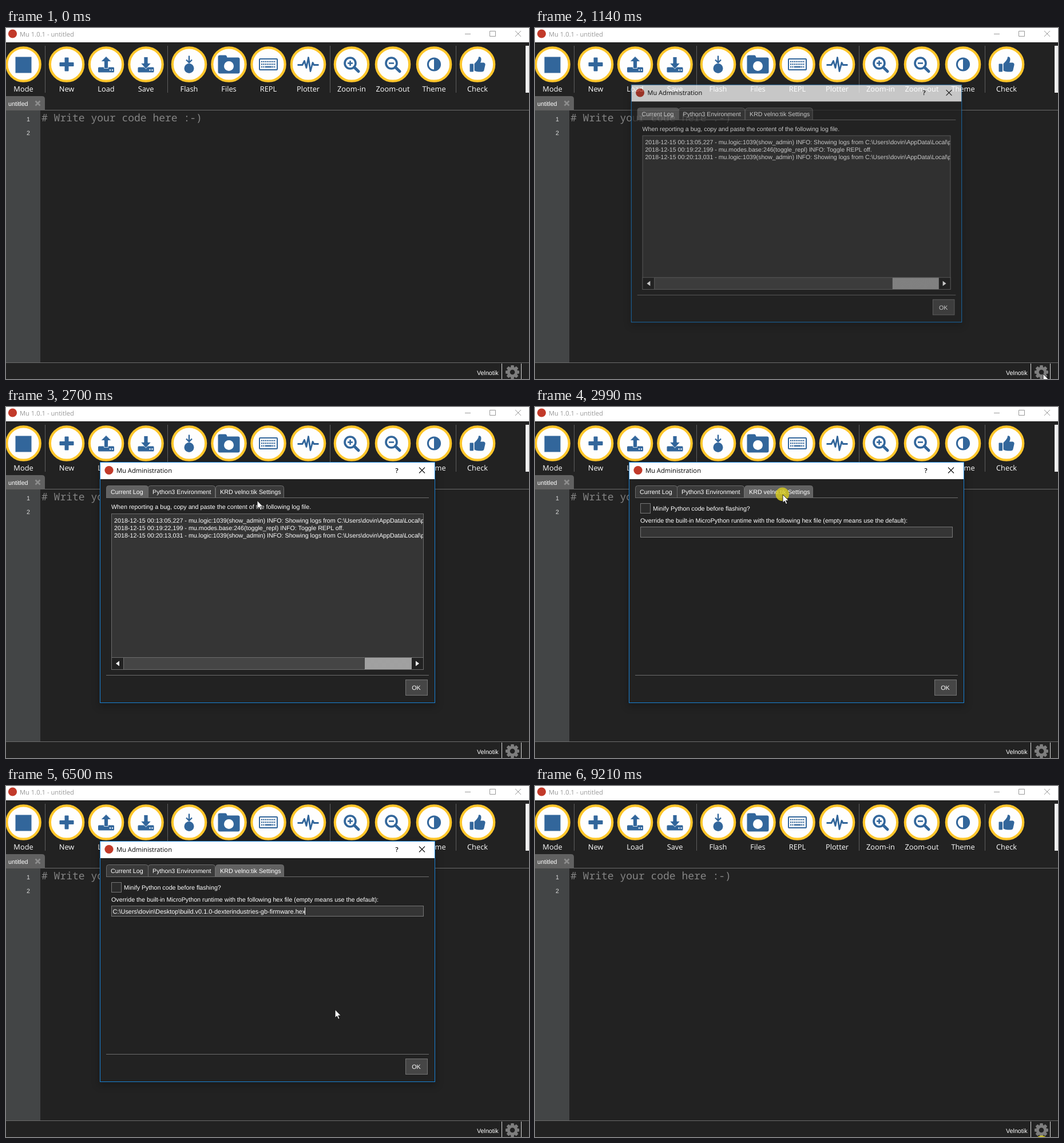
Animation, 914 px wide and 613 px high, one loop 9290 ms. Source, as an HTML page:

```html
<!DOCTYPE html>
<html lang="en">
<head>
<meta charset="utf-8">
<title>Editor settings</title>
<style>
html, body { margin: 0; width: 100%; height: 100%; overflow: hidden; background: #222; }
svg { display: block; }
text { white-space: pre; text-rendering: geometricPrecision; }
.ui { font: 10.72px "Liberation Sans", Arial, sans-serif; }
.title { font: 11.2px "Open Sans", "Noto Sans", sans-serif; }
.label { font: 12.8px "Open Sans", "Noto Sans", sans-serif; text-anchor: middle; }
.path { font: 10.95px "Liberation Sans", Arial, sans-serif; }
.code { font: 300 18px "Noto Sans Mono", "DejaVu Sans Mono", monospace; }
.mid { text-anchor: middle; }
</style>
</head>
<body>
<svg id="stage" width="914" height="613" viewBox="0 0 914 613"></svg>
<script>
const LOOP = 9290;
const BLUE = '#32669b', LINE = '#6c6c6c', DARK = '#222222', GEAR = '#7e7e7e';

const rect = (x, y, w, h, fill, more = '') =>
  `<rect x="${x}" y="${y}" width="${w}" height="${h}" fill="${fill}" ${more}/>`;
const box = (x, y, w, h, fill, stroke, more = '') =>
  rect(x + .5, y + .5, w - 1, h - 1, fill, `stroke="${stroke}" ${more}`);
const disc = (x, y, r, fill, more = '') =>
  `<circle cx="${x}" cy="${y}" r="${r}" fill="${fill}" ${more}/>`;
const stroke = (d, color, width = 1, more = '') =>
  `<path d="${d}" fill="none" stroke="${color}" stroke-width="${width}" ${more}/>`;
const shape = (d, fill, more = '') => `<path d="${d}" fill="${fill}" ${more}/>`;
const text = (x, y, str, cls = 'ui', fill = '#fff', more = '') =>
  `<text x="${x}" y="${y}" class="${cls}" fill="${fill}" ${more}>${str}</text>`;
const group = (id, body, more = '') => `<g id="${id}" ${more}>${body}</g>`;

// Toolbar icons are drawn around the centre of their button.
const tray = rect(-14, 5, 28, 9, BLUE, 'rx="1.5"') +
  disc(7, 10, 1.2, '#fff') + disc(11, 10, 1.2, '#fff');
const lens = disc(-2.5, -2, 9.5, 'none', `stroke="${BLUE}" stroke-width="3.6"`) +
  stroke('M4.5 5L12 12.3', BLUE, 5, 'stroke-linecap="round"') +
  stroke('M-7 -2H2', BLUE, 2.6);

function keyboard() {
  let s = rect(-15.5, -9.5, 31, 19, 'none', `stroke="${BLUE}" stroke-width="2" rx="1"`);
  for (let row = 0; row < 3; row++)
    for (let i = 0; i < 8; i++) {
      if (row === 2 && i > 1 && i < 6) continue;
      s += rect(-12.5 + i * 3.2, -6 + row * 4.6, 2, 2.4, BLUE);
    }
  return s + rect(-6, 3.2, 12, 2.4, BLUE);
}

const buttons = [
  [30.5, 'Mode', rect(-14, -13, 28, 28, BLUE)],
  [106, 'New', rect(-12.5, -3.5, 25, 7, BLUE, 'rx="1"') + rect(-3.5, -12, 7, 24, BLUE, 'rx="1"')],
  [175, 'Load', tray + shape('M0 -14L9 -5H3.5V7H-3.5V-5H-9Z', BLUE, 'stroke="#fff" stroke-width=".8"')],
  [244.5, 'Save', tray + shape('M0 8L9 -2H3.5V-13H-3.5V-2H-9Z', BLUE, 'stroke="#fff" stroke-width=".8"')],
  [320, 'Flash', stroke('M0 -15V-4M-5 -8L0 -3L5 -8', BLUE, 2.4) + disc(0, 7, 8.5, BLUE)],
  [389.5, 'Files', shape('M-19 -13Q-19 -16 -16 -16H-6Q-4 -16 -3 -12H16Q19 -12 19 -9V13Q19 16 16 16H-16Q-19 16 -19 13Z', BLUE) +
    disc(0, 3, 8.5, '#fff')],
  [458.5, 'REPL', keyboard()],
  [528, 'Plotter', stroke('M-18.5 1H-10L-6.5 -6L-3 6L.5 -12L4 12L8 -3L10 1H18.5', BLUE, 2.8, 'stroke-linejoin="round"')],
  [604, 'Zoom-in', lens + stroke('M-2.5 -6.5V2.5', BLUE, 2.6)],
  [676, 'Zoom-out', lens],
  [748, 'Theme', disc(0, 0, 10.6, 'none', `stroke="${BLUE}" stroke-width="3"`) + shape('M0 -10V10A10 10 0 0 0 0 -10Z', BLUE)],
  [824, 'Check', rect(-13.5, -1, 6.5, 14, BLUE, 'rx="1"') +
    shape('M-5.5 -1L-1 -6Q2 -9 2 -13Q6 -14 6.5 -9Q6.5 -6 5 -3H11Q14 -2 13.5 1L11.5 10Q11 13 7 13H2Q-2 13 -5.5 11Z', BLUE)],
];

const button = ([x, name, icon]) =>
  `<g transform="translate(${x} 63.5)">${disc(0, 0, 29.2, '#fefefe', 'stroke="#ffc62b" stroke-width="4.2"')}${icon}</g>` +
  text(x, 110.5, name, 'label');

function gear(x, y) {
  let s = '';
  for (let i = 0; i < 8; i++)
    s += rect(-2.8, -12, 5.6, 8, GEAR, `rx="1" transform="rotate(${i * 45})"`);
  return `<g transform="translate(${x} ${y})">${s}${disc(0, 0, 9.3, GEAR)}${disc(0, 0, 4.3, DARK)}</g>`;
}

const mainWindow = () =>
  rect(0, 0, 914, 613, DARK) + rect(0, 0, 914, 25, '#fff') +
  disc(11.5, 10, 7.6, '#c23a2a') +
  group('caption', text(24, 14.5, 'Mu 1.0.1 - untitled', 'title', 'currentColor') +
    stroke('M802 10.5H812M845.5 5.5H855.5V14.5H845.5ZM890 5L900 15M900 5L890 15', 'currentColor')) +
  [68, 282, 566, 786].map(x => rect(x, 31, 1, 82, '#5e5e5e')).join('') +
  buttons.map(button).join('') +
  rect(908, 31, 6, 82, '#f0f0f0') +
  rect(0, 143, 914, 1, LINE) +
  shape('M0 119H63Q68 119 68 124V144H0Z', '#616161') +
  text(4, 136, 'untitled') +
  stroke('M51.5 127.5L59.5 135.5M59.5 127.5L51.5 135.5', '#8d8d8d', 2.6) +
  rect(0, 144, 60, 440, '#434546') +
  text(39, 163, '1', 'ui mid', '#dcdcdc') + text(39, 187, '2', 'ui mid', '#dcdcdc') +
  text(62, 163, '# Write your code here :-)', 'code', '#858585') +
  rect(0, 584, 914, 1, LINE) +
  text(823, 606, 'Velnotik') +
  rect(866, 586, 1, 27, '#dadada') + rect(900, 586, 1, 27, '#dadada') +
  gear(885, 601);

const tab = (id, x, w, name) =>
  shape(`M${x + .5} 158V141.5Q${x + .5} 137.5 ${x + 4.5} 137.5H${x + w - 4.5}Q${x + w - .5} 137.5 ${x + w - .5} 141.5V158`,
    '#3a3a3a', `id="${id}" stroke="${LINE}"`) +
  text(x + 8, 152, name);

const logLines = [
  String.raw`2018-12-15 00:13:05,227 - mu.logic:1039(show_admin) INFO: Showing logs from C:\Users\dovin\AppData\Local\py`,
  '2018-12-15 00:19:22,199 - mu.modes.base:246(toggle_repl) INFO: Toggle REPL off.',
  String.raw`2018-12-15 00:20:13,031 - mu.logic:1039(show_admin) INFO: Showing logs from C:\Users\dovin\AppData\Local\py`,
];

const logPage = () =>
  text(184, 178, 'When reporting a bug, copy and paste the content of the following log file.') +
  box(184, 186, 546, 273, '#353535', LINE) +
  `<g clip-path="url(#logClip)">${logLines.map((s, i) => text(189, 202 + i * 12.8, s)).join('')}</g>` +
  box(184, 437, 546, 22, '#454545', LINE) +
  rect(185, 438, 20, 20, DARK) + rect(709, 438, 20, 20, DARK) +
  rect(205, 438, 1, 20, LINE) +
  rect(627, 438, 82, 20, 'url(#dots)') +
  shape('M192 448L198 443.5V452.5Z', '#fff') + shape('M722 448L716 443.5V452.5Z', '#fff');

const settingsPage = () =>
  box(184, 168, 18, 18, '#2b2b2b', '#777') +
  text(206, 181, 'Minify Python code before flashing?') +
  text(184, 202, 'Override the built-in MicroPython runtime with the following hex file (empty means use the default):') +
  box(184, 209, 546, 19, '#353535', '#777') +
  text(186.5, 223, String.raw`C:\Users\dovin\Desktop\build.v0.1.0-dexterindustries-gb-firmware.hex`, 'path', '#fff', 'id="hexPath"') +
  rect(187, 212, 1, 13, '#fff', 'id="caret"');

const dialog = () =>
  rect(162, 102, 590, 422, '#000', 'opacity=".22" filter="url(#blur)"') +
  box(164, 96, 586, 421, DARK, '#1883d7') +
  rect(165, 97, 584, 29, '#fff') +
  disc(180, 110.5, 7.6, '#c23a2a') +
  text(193, 115, 'Mu Administration', 'title', '#000') +
  text(683, 115, '?', 'title mid', '#000', 'style="font-weight:600"') +
  stroke('M722 105.5L732 115.5M732 105.5L722 115.5', '#111', 1.1) +
  rect(175, 158, 564, 1, LINE) +
  tab('tabLog', 175, 74, 'Current Log') +
  tab('tabPython', 248, 118, 'Python3 Environment') +
  tab('tabBoard', 366, 120, 'KRD velno:tik Settings') +
  group('logPage', logPage()) + group('settingsPage', settingsPage()) +
  rect(175, 468, 564, 1, LINE) +
  box(698, 476, 39, 28, '#464646', '#747474', 'id="okButton"') +
  text(717, 494, 'OK', 'ui mid');

const defs = `<defs>
  <clipPath id="logClip">${rect(185, 187, 544, 250, '#fff')}</clipPath>
  <pattern id="dots" width="2" height="2" patternUnits="userSpaceOnUse">
    ${rect(0, 0, 2, 2, '#515151')}${rect(0, 0, 1, 1, '#f0f0f0')}${rect(1, 1, 1, 1, '#f0f0f0')}</pattern>
  <filter id="blur"><feGaussianBlur stdDeviation="7"/></filter></defs>`;

document.getElementById('stage').innerHTML = defs + mainWindow() +
  group('dialog', dialog()) +
  disc(0, 0, 11.8, '#dccf1c', 'id="click" opacity=".78"') +
  group('arrow', shape('M0 0V14.2L3.3 11.2L5.6 16.6L7.9 15.6L5.6 10.4H10.2Z', '#fff', 'stroke="#000" stroke-width=".8"')) +
  group('beam', stroke('M-3 -7H-1M1 -7H3M0 -6.5V6.5M-3 7H-1M1 7H3', '#e8e8e8'));

const $ = id => document.getElementById(id);
const show = (id, on) => $(id).setAttribute('visibility', on ? 'inherit' : 'hidden');
const within = (t, ...spans) => spans.some(([a, b]) => t >= a && t < b);

// Pointer moves: first step, last step, number of steps, way points.
const moves = [
  [370, 760, 6, [[884, 616], [886, 608], [888, 604]]],
  [1530, 1760, 4, [[888, 604], [584.5, 395]]],
  [2070, 2140, 2, [[584.5, 395], [463.5, 206]]],
  [2370, 2840, 7, [[463.5, 206], [433, 153]]],
  [3310, 3780, 7, [[433, 153], [425, 219]]],
  [5640, 6330, 10, [[425, 219], [292.5, 216], [567, 385]]],
  [6500, 6960, 7, [[567, 385], [713.5, 485.5]]],
  [8360, 8600, 4, [[713.5, 485.5], [886, 608]]],
];

function pointer(t) {
  const [t0, t1, n, pts] = moves.filter(m => t >= m[0]).pop() || moves[0];
  const step = Math.min(n, Math.max(0, Math.floor((t - t0) * (n - 1) / (t1 - t0) + 1.001)));
  const u = step / n, f = u * u * (3 - 2 * u) * (pts.length - 1);
  const i = Math.min(pts.length - 2, Math.floor(f));
  return [0, 1].map(k => pts[i][k] + (pts[i + 1][k] - pts[i][k]) * (f - i));
}

// Window fade: time, scale, opacity.
const fades = [
  [0, 1, 0], [1060, .955, .35], [1140, .987, .75], [1220, .997, .94],
  [1300, 1, 1], [7280, .976, .44], [7350, 1, 0],
];

function draw(t) {
  const [, scale, alpha] = fades.filter(f => t >= f[0]).pop();
  show('dialog', alpha > 0);
  $('dialog').setAttribute('opacity', alpha);
  $('dialog').setAttribute('transform', `translate(457 306.5) scale(${scale}) translate(-457 -306.5)`);
  $('caption').setAttribute('color', within(t, [990, 1060], [7280, 9210]) ? '#000' : '#999');

  const [x, y] = pointer(t);
  const settings = t >= 2990;
  const overTab = t < 2990 && t > 2370 && y < 158 && x < 486;
  const dialogUp = alpha > 0;
  show('logPage', dialogUp && !settings);
  show('settingsPage', dialogUp && settings);
  $('tabLog').setAttribute('fill', settings ? '#3a3a3a' : '#626262');
  $('tabBoard').setAttribute('fill', settings ? '#626262' : overTab ? '#4c4c4c' : '#3a3a3a');

  show('hexPath', t >= 4930);
  show('caret', within(t, [3850, 4400], [4930, 5640], [6170, 6700]));
  $('caret').setAttribute('x', t < 4930 ? 187 : 522);
  const pressed = t >= 7110;
  $('okButton').setAttribute('fill', pressed ? '#3c3c3c' : '#464646');
  $('okButton').setAttribute('stroke', pressed ? '#b0b0b0' : '#747474');

  const overText = t >= 7280 ? y < 584
    : settings ? y >= 209 && y <= 228
    : t >= 1300 && y >= 187 && y < 437 && x > 184 && x < 730;
  const visible = within(t, [370, 8900]);
  show('arrow', visible && !overText);
  show('beam', visible && overText);
  $('arrow').setAttribute('transform', `translate(${x} ${y})`);
  $('beam').setAttribute('transform', `translate(${Math.floor(x) + .5} ${Math.floor(y) + .5})`);

  show('click', within(t, [990, 1140], [2990, 3160], [3850, 4000], [7110, 7280], [9210, LOOP]));
  $('click').setAttribute('cx', x - .7);
  $('click').setAttribute('cy', t >= 9210 ? 622 : y - .7);
}

function frame() {
  draw(performance.now() % LOOP);
  requestAnimationFrame(frame);
}
frame();
</script>
</body>
</html>
```
